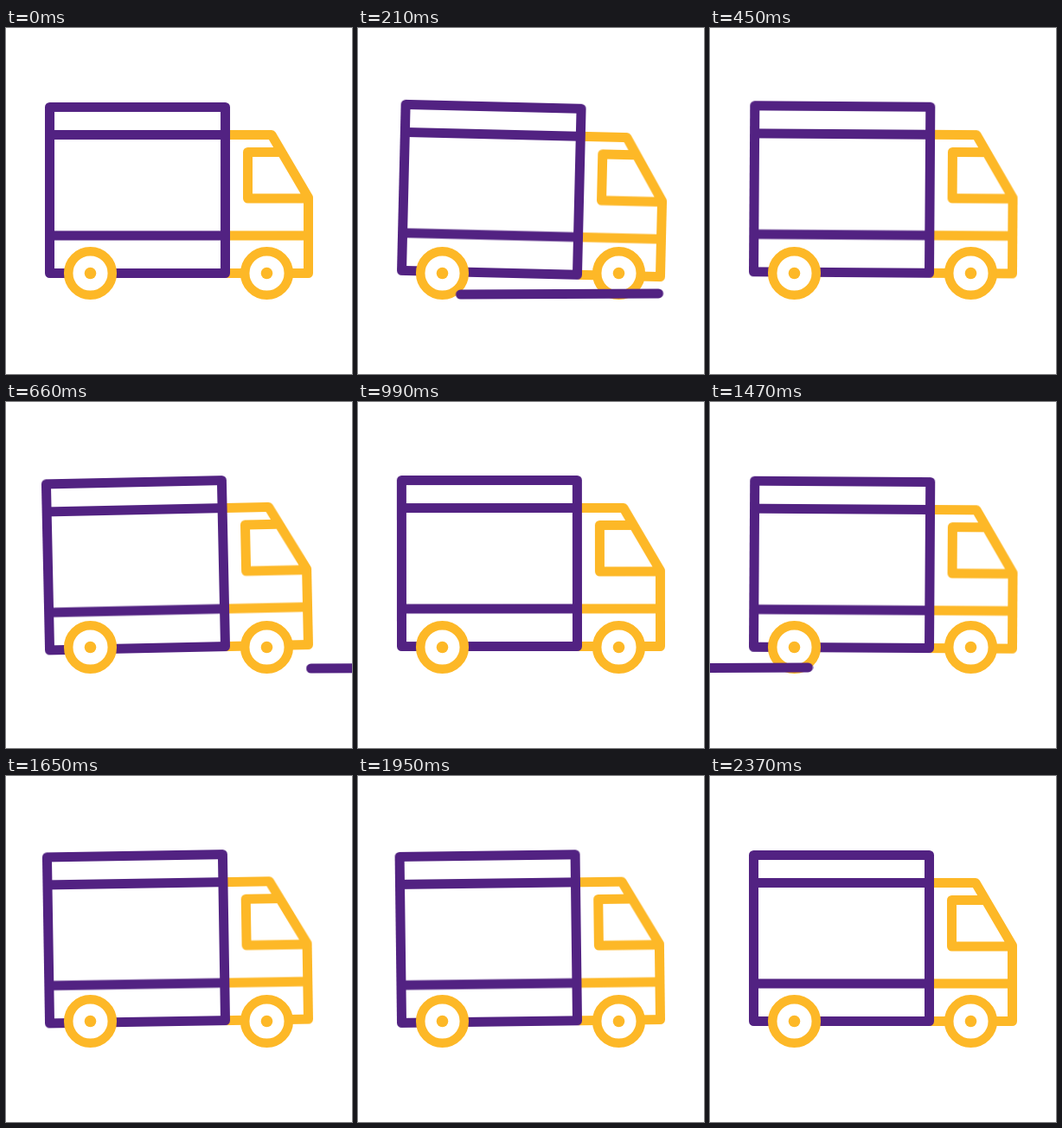
Write an HTML page that moves like this. It is 400 by 400 pixels and loops after 4460 ms.

```html
<!DOCTYPE html>
<html lang="en">
<head>
<meta charset="utf-8">
<title>Delivery truck</title>
<style>
  html, body { margin: 0; width: 100%; height: 100%; overflow: hidden; background: #fff; }
  svg { display: block; width: 100%; height: 100%; }

  .stroke { fill: none; stroke-width: 11; stroke-linecap: round; stroke-linejoin: round; }
  .purple { stroke: #522282; }
  .yellow { stroke: #fdb827; }
  .wheel { fill: #fff; stroke: #fdb827; stroke-width: 10.5; }
  .hub { fill: #fdb827; }

  .bob, .rock, .road { animation: 4460ms infinite; }
  .bob { animation-name: bob; animation-timing-function: ease-in-out; }
  .rock {
    animation-name: rock;
    animation-timing-function: cubic-bezier(.37, 0, .63, 1);
    transform-origin: 200px 283px;
  }
  .road { animation-name: road; animation-timing-function: step-end; }

  @keyframes rock {
    0% { transform: rotate(0deg); animation-timing-function: cubic-bezier(.39, .575, .565, 1); }
    5.605% { transform: rotate(1.4deg); }
    16.592% { transform: rotate(-1.4deg); }
    28.027% { transform: rotate(1.4deg); }
    39.462% { transform: rotate(-1.2deg); }
    49.327%, 100% { transform: rotate(0deg); }
  }

  @keyframes bob {
    0% { transform: translateY(0); }
    5.605% { transform: translateY(.5px); }
    10.09% { transform: translateY(-.6px); }
    14.798% { transform: translateY(.2px); }
    22.197% { transform: translateY(-1px); }
    28.924% { transform: translateY(1.3px); }
    36.996%, 100% { transform: translateY(0); }
  }

  /* three passes of the road dash, one step per 30 ms */
  @keyframes road {
    0% { transform: translateX(0); }
    1.323%, 14.103%, 26.883% {
      transform: translateX(0);
      animation-timing-function: steps(12);
    }
    9.395%, 22.175%, 34.955%, 100% { transform: translateX(-702px); }
  }
</style>
</head>
<body>
<svg viewBox="0 0 400 400">
  <defs>
    <g id="wheel">
      <circle class="wheel" r="25.3"/>
      <circle class="hub" r="6.8"/>
    </g>
  </defs>

  <g class="bob">
    <g class="rock">
      <path class="stroke yellow" d="M254 123.5H307L349.5 196V283.5H254M254 240H349.5M317 143.5H279.5V197H349.5"/>
      <path class="stroke purple" d="M50.5 91.5H253.5V283.5H50.5ZM50.5 123.5H253.5M50.5 240H253.5"/>
    </g>
  </g>

  <use href="#wheel" x="97.5" y="283.5"/>
  <use href="#wheel" x="301.5" y="283.5"/>

  <path class="stroke purple road" d="M411 308L640 307"/>
</svg>
</body>
</html>
```
